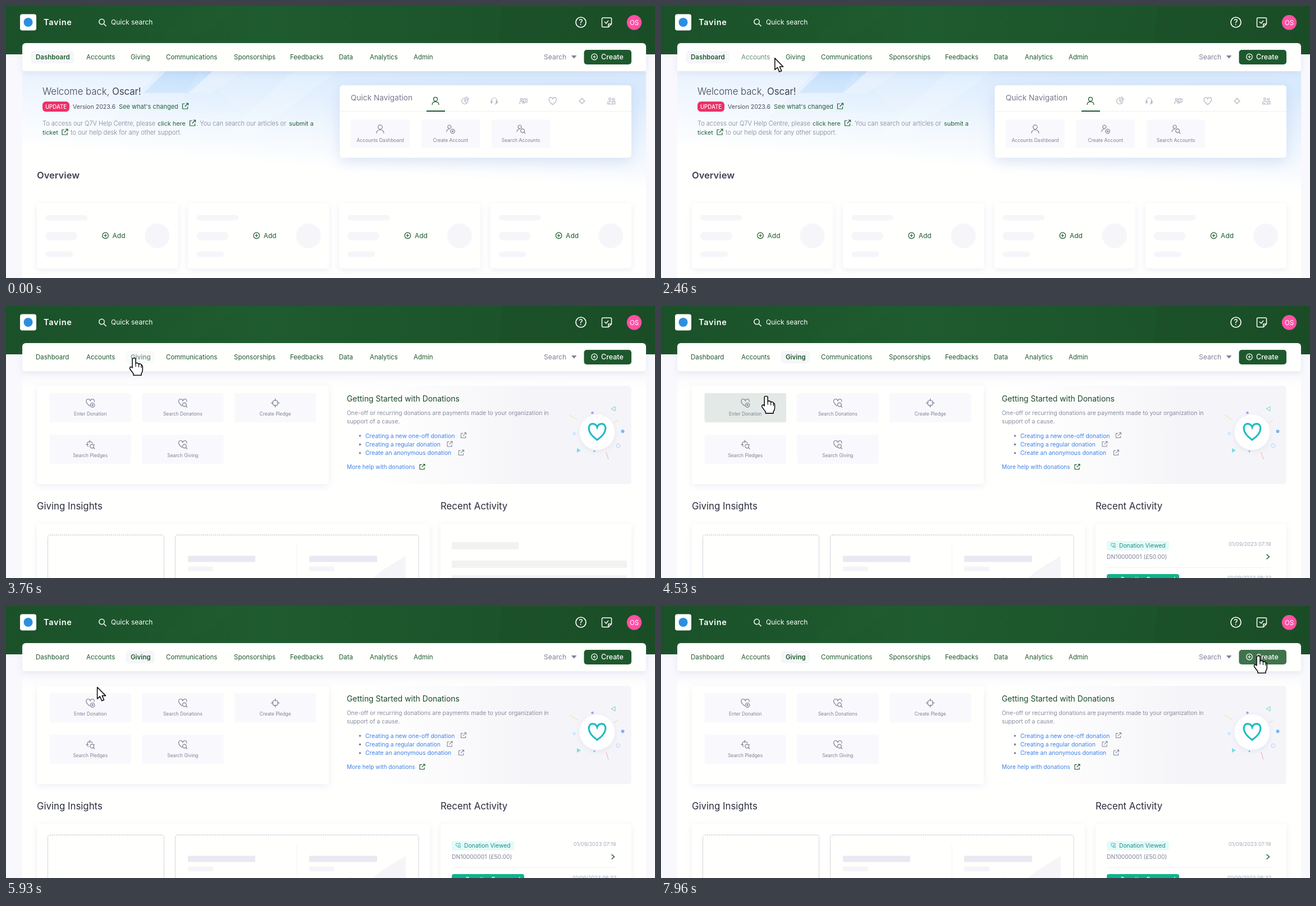
Recreate the animation shown at these times as an HTML page. Size 1156 by 484 pixels, loop 8 s.

```html
<!DOCTYPE html>
<html lang="en">
<head>
<meta charset="utf-8">
<title>Dashboard tour</title>
<style>
html, body { margin: 0; width: 100%; height: 100%; overflow: hidden; background: #f8f8fd; }
svg { display: block; width: 100%; height: 100%; }
text { font-family: Inter, "Open Sans", sans-serif; white-space: pre; }
.card { filter: drop-shadow(0 3px 6px #8c8cc826); }
</style>
</head>
<body>
<svg id="stage" viewBox="0 0 1156 484"></svg>
<script>
const GREEN = '#1e592d', LINK = '#24603a', GREY = '#7e8096', PALE = '#f9f9fd', WHITE = '#fffffe';
const LOOP = 8000;

// Markup helpers
const text = (s, x, y, size, fill, weight = 400, more = '') =>
  `<text x="${x}" y="${y}" font-size="${size}" fill="${fill}" font-weight="${weight}" ${more}>${s}</text>`;
const rect = (x, y, w, h, r, fill, more = '') =>
  `<rect x="${x}" y="${y}" width="${w}" height="${h}" rx="${r}" fill="${fill}" ${more}/>`;
const dot = (x, y, r, fill, more = '') => `<circle cx="${x}" cy="${y}" r="${r}" fill="${fill}" ${more}/>`;
const path = (d, fill, more = '') => `<path d="${d}" fill="${fill}" ${more}/>`;
const line = (d, stroke, w = 1, more = '') => path(d, 'none', `stroke="${stroke}" stroke-width="${w}" ${more}`);
const group = (id, body, more = '') => `<g id="${id}" ${more}>${body}</g>`;
const ring = (x, y, r) => `M${x - r},${y}a${r},${r} 0 1 0 ${2 * r},0a${r},${r} 0 1 0 ${-2 * r},0`;
const mid = 'text-anchor="middle"';

// Line icons centred on 0,0
const lens = 'M5.5,5.5L8,8' + ring(3, 3, 3.4);
const plus = 'M1.8,3.8h4M3.8,1.8v4' + ring(3.8, 3.8, 3.8);
const heart = 'M0,7C-10,0 -8,-7 -4,-7Q-1,-7 0,-4Q1,-7 4,-7C8,-7 10,0 0,7Z';
const openHeart = 'M-1,5.5C-10,-1 -8,-7 -4,-7Q-1,-7 0,-4Q1,-7 4,-7Q7.5,-6.5 7,-2';
const openAim = 'M-3,4A5,5 0 1 1 4,-2M-1,-8v5M-8,0h5M6,0h2';
const icons = {
  person: ring(0, -3.5, 3.8) + 'M-6.5,7.5Q-6.5,1.5 0,1.5T6.5,7.5',
  pie: ring(0, 0, 6) + 'M0,-6V0L5,-3M0,0L4,5M2,-8Q7,-7 7.5,-2',
  headset: 'M-5,2V-1A5,5 0 0 1 5,-1V2Q5,6 1,6M-6,0h2v4h-2zM4,0h2v4h-2z',
  chat: ring(-4, -3, 2) + 'M-7,6V2Q-4,-1 -1,2V6M0,-4H7V2H4L2,4V2H0ZM2,-1H5',
  people: ring(-3, -4, 2) + ring(4, -3, 2) + 'M-7,6V2Q-3,-2 0,2L7,1V6ZM-4,6V3M3,6V3',
  heart,
  aim: ring(0, 0, 5) + 'M0,-8v5M0,8v-5M-8,0h5M8,0h-5',
  heartAdd: openHeart + plus,
  heartFind: openHeart + lens,
  aimFind: openAim + lens,
  personAdd: ring(-2, -4, 3) + 'M-7,5Q-7,0 -2,0' + plus,
  personFind: ring(-2, -4, 3) + 'M-7,5Q-7,0 -2,0' + lens,
  link: 'M-1,-4H-5V5H4V1M1,-5H5V-1M5,-5L-1,1'
};
const icon = (name, x, y, color, scale = 1, w = 1.2) =>
  line(icons[name], color, w / scale, `transform="translate(${x} ${y}) scale(${scale})"`);
const addMark = (x, y, color) => line(ring(x, y, 5.3) + `M${x - 2.7},${y}h5.4M${x},${y - 2.7}v5.4`, color, 1.2);

const defs = `<defs>
  <linearGradient id="head"><stop stop-color="#1b5129"/><stop offset=".4" stop-color="#1e5b2e"/><stop offset="1" stop-color="#1b4f28"/></linearGradient>
  <linearGradient id="fade" gradientUnits="userSpaceOnUse" x1="600" y1="110" x2="587" y2="290">
    <stop stop-color="${WHITE}" stop-opacity="0"/><stop offset="1" stop-color="${WHITE}"/></linearGradient>
  <linearGradient id="help"><stop offset=".1" stop-color="#f6f6fa" stop-opacity="0"/><stop offset=".65" stop-color="#f5f5f9"/></linearGradient>
  <linearGradient id="drop" x2="0" y2="1"><stop stop-color="#f2f3f9"/><stop offset="1" stop-color="${WHITE}"/></linearGradient>
</defs>`;

const header = rect(0, 0, 1156, 86, 0, 'url(#head)') +
  path('M265,66L335,0H420L330,66Z', '#2b6b3b', 'opacity=".08"') +
  path('M884,0H1156V86H876Z', '#184723', 'opacity=".25"') +
  rect(25, 14.5, 29, 29, 4, '#fff') + dot(39.5, 29, 8, '#2b8fe0') +
  text('Tavine', 67, 33.5, 14.5, '#fff', 600, 'letter-spacing=".7"') +
  line(ring(170.5, 28, 4.7) + 'M174,31.5L178.5,36', '#fff', 1.5) +
  text('Quick search', 187, 33, 12, '#fff') +
  line(ring(1024, 29, 9), '#fff', 1.7) + text('?', 1024, 34, 14, '#fff', 500, mid) +
  line('M1063.5,21H1076.5Q1078.5,21 1078.5,23V32L1073,37.5H1063.5Q1061.5,37.5 1061.5,35.5V23Q1061.5,21 1063.5,21ZM1073,37V32H1078M1066,28L1069,31L1073,26', '#fff', 1.5) +
  dot(1119, 29.3, 13.2, '#ff50a4') + text('OS', 1119, 33.5, 11.5, '#fff', 400, mid);

// Label, text x and text width
const nav = [['Dashboard', 53, 60], ['Accounts', 143, 50], ['Giving', 222, 34], ['Communications', 285, 92],
  ['Sponsorships', 406, 71], ['Feedbacks', 506, 58], ['Data', 593, 26], ['Analytics', 648, 48], ['Admin', 726, 34]];
const bar = rect(29, 66, 1111, 50, 6, WHITE, 'class="card"') +
  nav.map(([s, x, w], i) => rect(x - 8.5, 80, w + 17, 22, 5, '#f5f6f9', `id="pill${i}"`) +
    text(s, x, 95, 11.5, GREEN, 400, `id="nav${i}"`)).join('') +
  text('Search', 958, 95, 12.1, GREY) + path('M1007,88H1016.5L1011.7,93.5Z', GREY) +
  rect(1029.5, 78, 84.5, 26, 5, GREEN) + rect(1029.5, 78, 84.5, 26, 5, '#fff', 'id="glow"') +
  addMark(1048, 90.5, '#fff') + text('Create', 1060, 95, 12.5, '#fff', 500);

// Home page
const tabs = ['person', 'pie', 'headset', 'chat', 'heart', 'aim', 'people'];
const shortcuts = [['person', 'Accounts Dashboard'], ['personAdd', 'Create Account'], ['personFind', 'Search Accounts']];
const homeCard = i => `<g transform="translate(${i * 269.2} 0)">` +
  rect(55, 351, 251.5, 116, 5, WHITE, 'class="card"') +
  [[372, 75, 9.5], [402, 57, 15], [437, 49, 9.5]].map(([y, w, h]) => rect(70, y, w, h, h / 2, '#f6f6fa')).join('') +
  dot(269.5, 409, 22, '#f6f6fa') + addMark(177, 408.5, GREEN) + text('Add', 189.5, 413, 12, GREEN) + '</g>';
const home =
  rect(29, 116, 1111, 204, 0, '#d9eafd') +
  path('M29,116H275L165,225H29Z', '#eaf4ff', 'opacity=".6"') +
  path('M285,116H368L325,155H245Z', '#a9d3fa', 'opacity=".6"') +
  path('M345,116L420,190H300Z', '#c9e3fc', 'opacity=".4"') +
  path('M368,116H425L365,155H325Z', '#e6f2fe', 'opacity=".5"') +
  path('M510,116H590L440,230H390Z', '#e6f2ff', 'opacity=".35"') +
  rect(29, 116, 1111, 205, 0, 'url(#fade)') +
  `<text x="65" y="158" font-size="16.7" fill="#3f4254" font-weight="300">Welcome back, <tspan font-weight="400">Oscar!</tspan></text>` +
  rect(65, 170, 48, 18, 6, '#ec3168') + text('UPDATE', 89, 183, 9.7, '#fff', 500, mid) +
  text('Version 2023.6', 119, 183, 10.6, '#4a4d60') + text("See what's changed", 201, 183, 11, LINK) +
  icon('link', 319.5, 178, LINK) +
  text('To access our Q7V Help Centre, please', 65, 213, 11, GREY, 300) + text('click here', 270, 213, 10.9, LINK) +
  icon('link', 332.5, 208, LINK) + text('. You can search our articles or', 339, 213, 11.1, GREY, 300) +
  text('submit a', 504, 213, 10.9, LINK) + text('ticket', 65, 229, 10.8, LINK) + icon('link', 105, 224, LINK) +
  text('to our help desk for any other support.', 115, 229, 11.1, GREY, 300) +
  rect(594.5, 141, 519.5, 129, 6, WHITE, 'style="filter:drop-shadow(0 8px 12px #5a82d22e)"') +
  text('Quick Navigation', 614, 168, 13.7, '#77798f') +
  tabs.map((n, i) => icon(n, 765 + i * 52.2, 169, i ? '#b2b4c4' : GREEN, n == 'aim' ? .75 : .92)).join('') +
  rect(595, 187, 519, 1, 0, '#f0f0f5') + rect(749, 186, 33, 2, 0, GREEN) +
  shortcuts.map(([n, s], i) => rect(614 + i * 125.3, 202, 105, 51, 3, PALE) +
    icon(n, 666.5 + i * 125.3, 219, GREY) + text(s, 666.5 + i * 125.3, 241.5, 8.5, GREY, 400, mid)).join('') +
  text('Overview', 55, 307, 16.5, '#3f4254', 600) + [0, 1, 2, 3].map(homeCard).join('');

// Giving page
const actions = [['heartAdd', 'Enter Donation'], ['heartFind', 'Search Donations'], ['aim', 'Create Pledge'],
  ['aimFind', 'Search Pledges'], ['heartFind', 'Search Giving']];
const panel = (id, y, h, gap, hot) => group(id,
  rect(55, y, 520, h, 5, WHITE, 'class="card"') + rect(594, y, 520, h, 5, 'url(#help)') +
  actions.map(([n, s], i) => {
    const x = 77.5 + i % 3 * 164.7, top = y + 13 + (i > 2 ? gap : 0);
    const label = c => icon(n, x + 72.7, top + 17.5, c) + text(s, x + 72.7, top + 40, 8.4, c, 400, mid);
    return rect(x, top, 145.5, 52, 3, PALE) + (hot && !i ? rect(x, top, 145.5, 52, 3, GREEN, 'id="tile"') : '') +
      label(GREY) + (hot && !i ? group('tileLabel', label('#fff')) : '');
  }).join(''));

const bones = (list, fill) => list.map(([x, y, w, h]) => rect(x, y, w, h, 1, fill)).join('');
const BLUE = '#3f83e8';
const guides = [['Creating a new one-off donation', 815], ['Creating a regular donation', 790.5], ['Create an anonymous donation', 811]];
const help = group('help',
  text('Getting Started with Donations', 607, 170, 13.9, '#1d4a2b') +
  text('One-off or recurring donations are payments made to your organization in', 607, 194, 10.3, '#8a8ca0') +
  text('support of a cause.', 607, 209, 10.3, '#8a8ca0') +
  guides.map(([s, x], i) => dot(630.5, 231 + i * 15.4, 1.8, GREY) +
    text(s, 640, 234.5 + i * 15.4, 10.4, BLUE) + icon('link', x, 230 + i * 15.4, GREY, .9, 1)).join('') +
  text('More help with donations', 607, 290, 10.2, BLUE) + icon('link', 741.5, 286, GREEN, .9, 1.1) +
  line('M1004,194L1018,203M1083,208L1090,203', '#fbd3a0') + line('M1069,260L1073,273', '#f7aaa5') +
  line('M1078,183L1085,179V187Z', '#72d6a4') + path('M1017,253L1024,257L1017,261Z', '#7adbe6') +
  line(ring(1090.5, 248.5, 3.3) + ring(1012, 227, 2.2), '#a9d3fa') +
  dot(1044.5, 190, 2.3, '#b59bf0') + dot(1098.5, 223, 3, '#78b5f8') + dot(1048, 258.5, 1.5, '#78b5f8') +
  dot(1053, 224.5, 31.5, '#fff', 'class="card"') +
  line(heart, '#1bbcc4', 1.5, 'transform="translate(1053 224) scale(2.05)"'));

const giving =
  rect(29, 116, 1111, 30, 0, 'url(#drop)', 'opacity=".6"') +
  panel('early', 163, 147, 60, false) +
  group('helpBones', bones([[607, 189, 188, 13], [607, 222, 494, 13], [607, 248, 302, 13]], '#f1f1f3')) +
  panel('late', 142, 175, 74, true) + help +
  group('lower',
    text('Giving Insights', 55, 362, 16.8, '#2b2d3e') + text('Recent Activity', 774, 362, 16.8, '#2b2d3e') +
    rect(55, 388, 700, 150, 5, WHITE, 'class="card"') + rect(774, 388, 340, 150, 5, WHITE, 'class="card"') +
    [[74.5, 207], [301.5, 433.5]].map(([x, w]) => rect(x, 407.5, w, 140, 4, 'none', 'stroke="#b4b5c4" stroke-dasharray="2 1.5"')).join('') +
    addMark(148, 491.5, GREEN) + text('Pin Metric', 160, 495.5, 11.6, '#3f4254') +
    line('M518,424V540', '#f4f4f8') +
    path('M572,500L612,482L642,494L668,472L690,458L712,445V540H572Z', '#f5f5f9') +
    bones([[324, 444.5, 120, 11], [540, 444.5, 121, 11]], '#e8e9f1') +
    bones([[324, 463.5, 45, 8.5], [540, 463.5, 45, 8.5]], '#f5f5f9') +
    group('rowBones', bones([[794, 420, 119, 13], [794, 453, 312, 13], [794, 479, 312, 13]], '#f2f2f3')) +
    group('rows',
      rect(794, 418, 111, 17, 4, '#e4fbf8') + icon('heartFind', 805.5, 426, '#13a5a5', .55, .9) +
      text('Donation Viewed', 816, 430, 10.3, '#1d8d87') +
      text('01/09/2023 07:19', 1011, 427, 9.2, '#a6a8b8') +
      text('DN10000001 (£50.00)', 794, 450, 10.3, GREY) + line('M1078.5,442L1083.5,446.3L1078.5,450.5', GREEN, 1.4) +
      rect(794, 465, 292, 1, 0, '#f3f3f7') + rect(794, 477, 129, 18, 4, '#0db48a') +
      text('Donation Processed', 819, 490, 10, '#fff', 600) + text('01/09/2023 06:32', 1009, 487, 9.2, '#a6a8b8')));

const inkMore = 'stroke="#111" stroke-width="1.6" stroke-linejoin="round"';
const cursor = group('cursor',
  path('M.7,.9V21.5L5.4,17.3L8.8,25.1L12.6,23.4L9.3,16H15.6Z', '#fff', inkMore + ' id="arrow"') +
  group('hand', path('M-3,18V3Q-3,.8 0,.8T3,3V11Q3,8.5 6,9.5T8.5,12Q9,10 12,11.5T13,14Q15.3,13 15.3,16V22Q15.3,26 13,28V31.2H-1V28.5L-7,20.5Q-8.5,17.5 -6,16.3Q-4.5,16.2 -3,18Z', '#fff', inkMore) +
    line('M3,11V16M8.5,12V17M13,14V18', '#111', 1.2)));

const stage = document.getElementById('stage');
stage.innerHTML = defs + header + rect(29, 100, 1111, 384, 0, WHITE) +
  group('home', home) + group('giving', giving) + bar + cursor;

// Time, pointer x, pointer y
const track = [[1130, 168, 490], [1430, 124, 171], [1860, 124, 171], [2200, 150, 94], [2455, 202, 92],
  [2600, 226, 92], [2700, 226, 92], [2790, 191, 91], [2900, 228, 92], [4330, 228, 92], [4690, 158, 208],
  [5405, 158, 208], [5450, 158, 203], [5800, 165, 119], [6190, 153, 214], [6520, 153, 214], [6560, 234, 208],
  [6790, 830, 165], [7190, 830, 165], [7940, 1064, 88]];
function pointer(t) {
  const i = track.findIndex(k => k[0] > t);
  if (i < 0) return track.at(-1).slice(1);
  if (!i) return track[0].slice(1);
  const [a, x, y] = track[i - 1], [b, u, v] = track[i];
  const p = (t - a) / (b - a), e = p * p * (3 - 2 * p);
  return [x + (u - x) * e, y + (v - y) * e];
}
const inside = ([x, y], [l, t, r, b]) => x >= l && x <= r && y >= t && y <= b;
// Share of the last 100 ms the pointer spent in a box
function hover(box, t, from = 0) {
  let n = 0;
  for (let i = 0; i < 10; i++) if (t - i * 10 > from && inside(pointer(t - i * 10), box)) n++;
  return n / 10;
}
const navBoxes = nav.map(([, x, w]) => [x - 8.5, 80, x + w + 8.5, 102]);
const tileBox = [77, 155, 223, 207], createBox = [1029, 78, 1114, 104];
const clamp = v => Math.min(1, Math.max(0, v));

const el = {};
stage.querySelectorAll('[id]').forEach(e => el[e.id] = e);
const show = (id, v) => el[id].setAttribute('opacity', +v);

function draw(now) {
  const t = now % LOOP, open = t >= 3330, loaded = t >= 3560;
  const active = t < 3400 ? 0 : 2;
  el.home.style.display = open ? 'none' : '';
  el.giving.style.display = open ? '' : 'none';
  show('early', !loaded);
  show('helpBones', !loaded);
  show('late', loaded);
  show('help', clamp((t - 3560) / 160));
  el.lower.setAttribute('transform', `translate(0 ${loaded ? 0 : -8})`);
  const rows = clamp((t - 4010) / 50);
  show('rows', rows);
  show('rowBones', 1 - rows);

  nav.forEach((_, i) => {
    const h = hover(navBoxes[i], t);
    el['nav' + i].setAttribute('font-weight', i == active ? 600 : 400);
    show('nav' + i, 1 - .42 * h);
    show('pill' + i, i == active ? 1 - .45 * h : 0);
  });
  const h = hover(tileBox, t, 3760);
  show('tile', h);
  show('tileLabel', clamp(2 * h - 1));
  show('glow', .15 * hover(createBox, t));

  const p = pointer(t);
  const hand = navBoxes.some(b => inside(p, b)) || inside(p, createBox) || (open && inside(p, tileBox));
  show('hand', hand);
  show('arrow', !hand);
  el.cursor.setAttribute('transform', `translate(${p})`);
  requestAnimationFrame(loop);
}
let start;
function loop(now) {
  start ??= now;
  draw(now - start);
}
requestAnimationFrame(loop);
</script>
</body>
</html>
```
